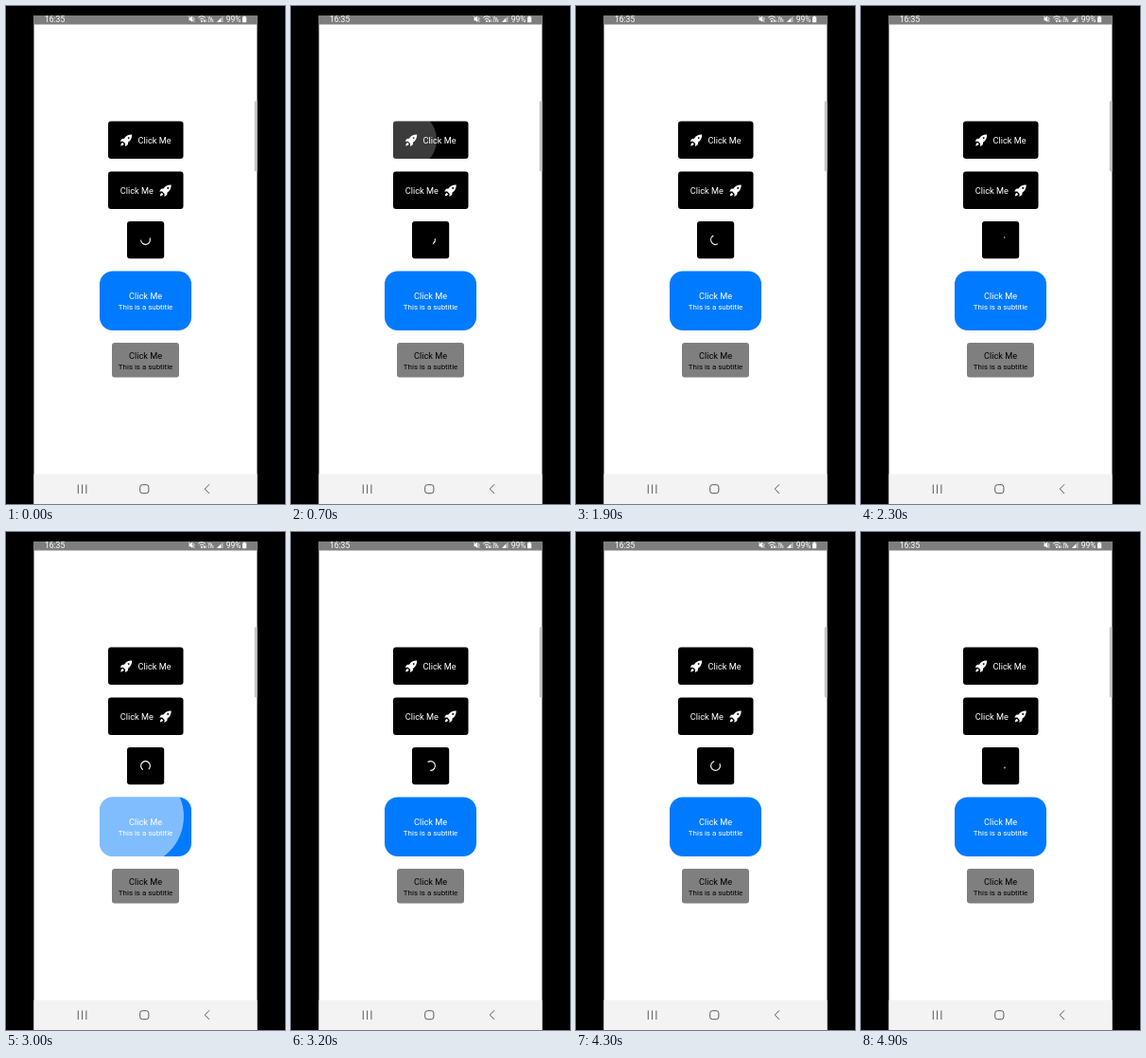
Recreate the animation shown at these times as an HTML page. Size 295x525 px, loop 5 s.

```html
<!DOCTYPE html>
<html lang="en">
<head>
<meta charset="utf-8">
<title>Buttons</title>
<style>
  html, body { margin: 0; width: 100%; height: 100%; overflow: hidden; background: #000; }
  svg { display: block; width: 295px; height: 525px; font-family: Roboto, Arial, sans-serif; }
  .title { font-size: 9.2px; }
  .sub { font-size: 7.93px; }
  .mid { text-anchor: middle; }
  .bar { font-size: 8.5px; }
  .nav { fill: none; stroke: #5a5a5a; stroke-width: 1; }
</style>
</head>
<body>
<svg viewBox="0 0 295 525">
  <defs>
    <path id="rocket" fill-rule="evenodd" d="M12.7 .3C9 .2 6.4 1.6 4.5 4.4L2 4.7 .2 7.5 3.2 7.4 5.6 9.8 5.5 12.8 8.3 11 8.6 8.5C11.4 6.6 12.8 4 12.7 .3ZM9.2 3a.85 .85 0 1 0 .01 0ZM2.7 8.8C1.4 9.2 1 10.6 .8 12.2 2.4 12 3.8 11.6 4.2 10.3Z"/>
    <clipPath id="clip0"><rect x="108" y="121.5" width="79.5" height="39.5" rx="3"/></clipPath>
    <clipPath id="clip1"><rect x="108" y="174.5" width="79.5" height="39.5" rx="3"/></clipPath>
    <clipPath id="clip2"><rect x="99" y="279.5" width="97" height="62.5" rx="14"/></clipPath>
  </defs>

  <rect width="295" height="525"/>
  <rect x="29.5" y="10" width="236" height="515" fill="#fff"/>
  <rect x="29.5" y="10" width="236" height="9.5" fill="#7e7e7e"/>
  <rect x="29.5" y="493.5" width="236" height="31.5" fill="#f3f3f3"/>
  <path d="M265.5 100h-1.2q-1.6 0-1.6 2v70.500q0 2 1.600 2h1.200z" fill="#c6c6c6"/>

  <!-- status bar -->
  <g fill="#fff">
    <text class="bar" x="41" y="16.900">16:35</text>
    <text class="bar" x="232.700" y="16.900">99%</text>
    <path d="M193.500 12.300h1.500l2.200-1.800v6.600l-2.200-1.800h-1.500z"/>
    <path d="M193 10.500l6.500 6.500M198.500 12q1 1.600 0 3.200" fill="none" stroke="#fff" stroke-width=".8"/>
    <g fill="none" stroke="#fff" stroke-width=".9">
      <path d="M203.200 12.400q3.800-3.200 7.600 0M204.700 14.100q2.300-1.900 4.600 0"/>
    </g>
    <circle cx="207" cy="16" r="1.100"/>
    <path d="M209 17v-2.500h1v2.500zM210.600 17v-2.500h1v2.500z"/>
    <text x="213.500" y="13.500" font-size="3.800" font-weight="700">Vo</text>
    <text x="213.500" y="17.100" font-size="3.800" font-weight="700">LTE</text>
    <path d="M223 17l6.500-6.500v6.500z" opacity=".45"/>
    <path d="M223 17l4-4v4z"/>
    <path d="M250 11.400h1.300v-.9h1.600v.9h1.300v5.800h-4.200z"/>
  </g>

  <!-- buttons -->
  <rect x="108" y="121.500" width="79.500" height="39.500" rx="3"/>
  <rect x="108" y="174.500" width="79.500" height="39.500" rx="3"/>
  <rect x="128" y="227" width="39.200" height="39.200" rx="3"/>
  <rect x="99" y="279.500" width="97" height="62.500" rx="14" fill="#007aff"/>
  <rect x="112" y="355" width="71" height="36.500" rx="3" fill="#7f7f7f"/>
  <g id="ripples" fill="#fff"></g>

  <g fill="#fff">
    <use href="#rocket" x="120.500" y="135.300"/>
    <text class="title" x="139.500" y="144.700">Click Me</text>
    <text class="title" x="120.700" y="197.700">Click Me</text>
    <use href="#rocket" x="162" y="188.100"/>
    <text class="title mid" x="147.600" y="308.800">Click Me</text>
    <text class="sub mid" x="147.600" y="319.900">This is a subtitle</text>
  </g>
  <text class="title mid" x="147.600" y="371.500">Click Me</text>
  <text class="sub mid" x="147.600" y="382.500">This is a subtitle</text>
  <path id="spinner" fill="none" stroke="#fff" stroke-width="1.100" stroke-linecap="square"/>

  <!-- navigation bar -->
  <g class="nav">
    <path d="M76.300 504.500v9.500M80.600 504.500v9.500M84.900 504.500v9.500"/>
    <rect x="141.700" y="504.700" width="9.200" height="9" rx="2.600"/>
    <path d="M215 504.300l-4.700 4.800 4.700 4.800"/>
  </g>
</svg>
<script>
const LOOP = 5000, STEP = 100;
const SPIN = { x: 147.5, y: 246.5, r: 4.9, cycle: 1333, start: 1034, turn: 52, speed: 0.162 };
const TAPS = [
  { at: 600, x: 123.5, y: 141, r: 55, alpha: 0.23 },
  { at: 1940, x: 148, y: 194, r: 55, alpha: 0.23 },
  { at: 2830, x: 136, y: 300, r: 64, alpha: 0.5 }
];

const clamp = v => Math.min(1, Math.max(0, v));
const spinner = document.getElementById('spinner');
const layer = document.getElementById('ripples');
const ripples = TAPS.map((tap, i) => {
  const g = document.createElementNS('http://www.w3.org/2000/svg', 'g');
  const c = document.createElementNS('http://www.w3.org/2000/svg', 'circle');
  g.setAttribute('clip-path', `url(#clip${i})`);
  c.setAttribute('cx', tap.x);
  c.setAttribute('cy', tap.y);
  g.append(c);
  layer.append(g);
  return c;
});

// Bezier (0,0) (.2,0) (.1,1) (.5,1), solved for x by bisection
function trim(x) {
  if (x <= 0) return 0;
  if (x >= 0.5) return 1;
  let lo = 0, hi = 1;
  for (let i = 0; i < 24; i++) {
    const u = (lo + hi) / 2, v = 1 - u;
    if (0.6 * v * v * u + 0.3 * v * u * u + 0.5 * u * u * u < x) lo = u;
    else hi = u;
  }
  return lo * lo * (3 - 2 * lo);
}

function point(deg) {
  const a = deg * Math.PI / 180;
  return `${(SPIN.x + SPIN.r * Math.sin(a)).toFixed(3)} ${(SPIN.y - SPIN.r * Math.cos(a)).toFixed(3)}`;
}

function drawSpinner(t) {
  const p = ((t - SPIN.start) / SPIN.cycle + 2) % 1;
  const base = SPIN.turn + SPIN.speed * t + 90 * p;
  const from = base + 270 * trim(p - 0.5);
  const to = Math.max(base + 270 * trim(p), from + 1);
  const large = to - from > 180 ? 1 : 0;
  spinner.setAttribute('d', `M${point(from)}A${SPIN.r} ${SPIN.r} 0 ${large} 1 ${point(to)}`);
}

function drawRipple(tap, c, t) {
  const age = t - tap.at;
  const grow = 1 - (1 - clamp(age / 300)) ** 2;
  const fade = clamp(age / 75) * (1 - clamp((age - 200) / 150));
  c.setAttribute('r', tap.r * grow);
  c.setAttribute('opacity', tap.alpha * fade);
}

const begin = performance.now();
function frame() {
  const now = Math.max(0, performance.now() - begin) % LOOP;
  const t = Math.floor(now / STEP) * STEP;
  drawSpinner(t);
  TAPS.forEach((tap, i) => drawRipple(tap, ripples[i], t));
  requestAnimationFrame(frame);
}
frame();
</script>
</body>
</html>
```
